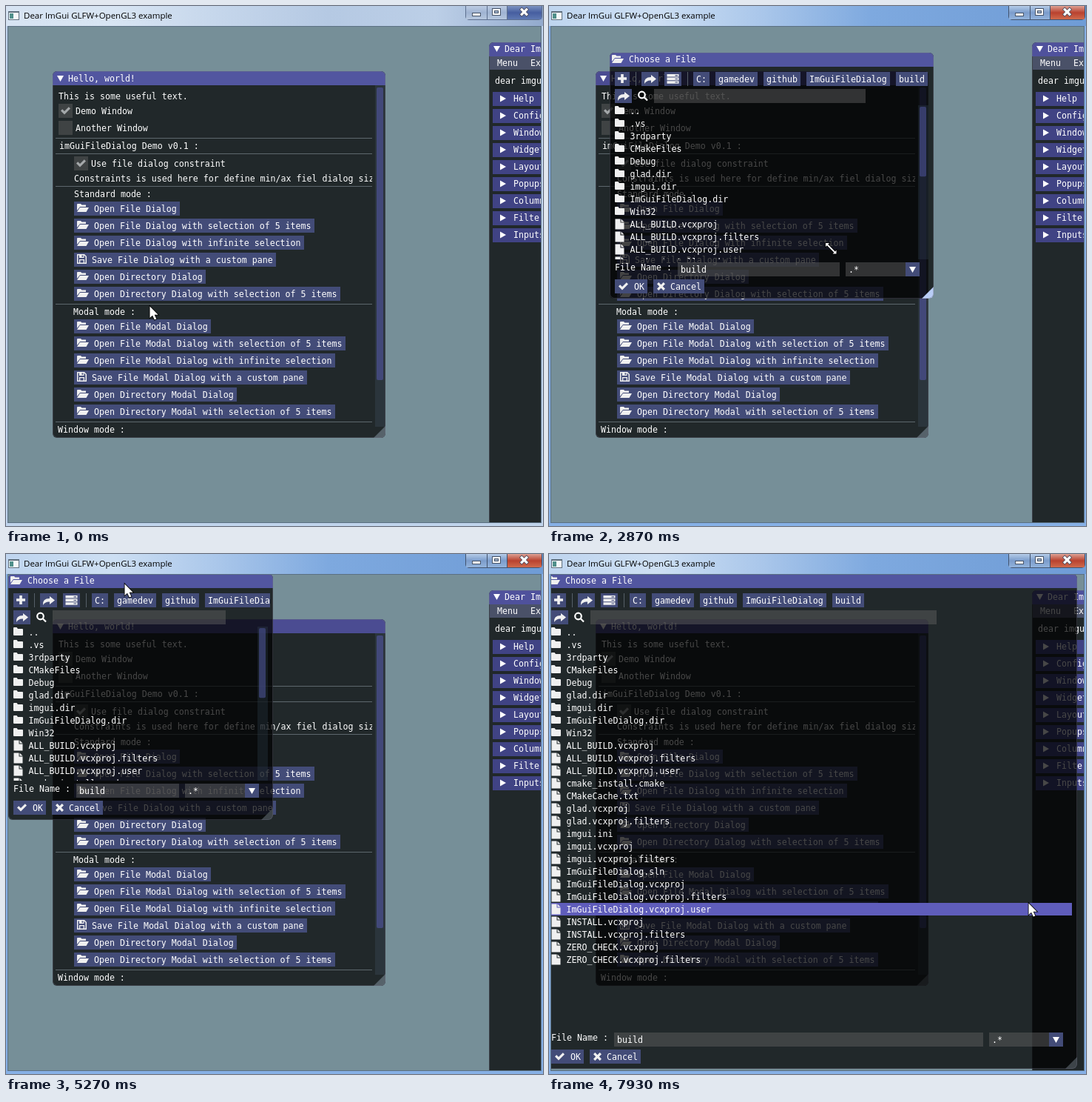
These frames come from a looping animation (726x702 px, 8000 ms). An HTML page with a canvas:

```html
<!DOCTYPE html>
<html lang="en">
<head>
<meta charset="utf-8">
<title>File dialog demo</title>
<style>
html, body { margin: 0; width: 100%; height: 100%; overflow: hidden; background: #768f98; }
canvas { display: block; }
</style>
</head>
<body>
<canvas id="stage" width="726" height="702"></canvas>
<script>
const ctx = document.getElementById('stage').getContext('2d');
const LOOP = 8000;
const MONO = '11.627px "DejaVu Sans Mono", monospace';
const WHITE = '#fff', BUTTON = '#434c78', FIELD = 'rgba(100,100,100,.45)', GLASS = 'rgba(0,0,0,.72)';

// Each key: time, then the values reached at that time.
const cursorKeys = [
  [0, 194, 405], [200, 196, 421], [330, 190, 400], [670, 167, 278], [1270, 167, 278],
  [1800, 470, 390], [2130, 592, 399], [2200, 596, 399], [2400, 596, 399], [2670, 560, 365],
  [2800, 490, 345], [2870, 381, 327], [3000, 290, 296], [3130, 251, 278], [3530, 250, 277],
  [3670, 256, 272], [3870, 256, 272], [4470, 231, 69], [4730, 209, 58], [5270, 160, 40],
  [5600, 153, 40], [6130, 340, 343], [6270, 342, 345], [6470, 351, 356], [6730, 351, 356],
  [6870, 423, 444], [7330, 715, 692], [7530, 715, 692], [7730, 663, 497], [7800, 663, 497],
  [7870, 654, 491], [7930, 648, 471]
];
// left, top, right, bottom
const dialogKeys = [
  [2400, 82, 63, 600, 403], [2670, 82, 63, 575, 396], [2870, 82, 63, 520, 395],
  [3000, 82, 63, 441, 395], [4470, 82, 63, 441, 395], [4730, 60, 52, 418, 385],
  [5270, 3, 27, 361, 359], [5600, -4, 27, 355, 359], [6730, -4, 27, 355, 359],
  [6870, -4, 27, 382, 399], [7330, -4, 27, 714, 695]
];

const projects = ['ALL_BUILD.vcxproj', 'ALL_BUILD.vcxproj.filters', 'ALL_BUILD.vcxproj.user',
  'cmake_install.cmake', 'CMakeCache.txt', 'glad.vcxproj', 'glad.vcxproj.filters', 'imgui.ini',
  'imgui.vcxproj', 'imgui.vcxproj.filters', 'ImGuiFileDialog.sln', 'ImGuiFileDialog.vcxproj',
  'ImGuiFileDialog.vcxproj.filters', 'ImGuiFileDialog.vcxproj.user', 'INSTALL.vcxproj',
  'INSTALL.vcxproj.filters', 'ZERO_CHECK.vcxproj', 'ZERO_CHECK.vcxproj.filters'];
const folders = ['..', '.vs', '3rdparty', 'CMakeFiles', 'Debug', 'glad.dir', 'imgui.dir',
  'ImGuiFileDialog.dir', 'Win32'];
const rows = [...folders, ...projects];

const icons = {
  open: new Path2D('M0 1Q0 0 1 0H5L6.5 1.5H12V4H4L0 9zM0 11L4 5H16L12.5 11z'),
  folder: new Path2D('M0 1Q0 0 1 0H4.5L6 2H12Q13 2 13 3V10Q13 11 12 11H1Q0 11 0 10z'),
  file: new Path2D('M0 0H7V5H12V14H0zM8 0L12 4H8z'),
  floppy: new Path2D('M0 0H10L13 3V13H0zM1.5 1.5V11.5H3V7H10V11.5H11.5V3.5L9.5 1.5V5H3V1.5zM4.3 8.2V11.5H8.7V8.2zM6.5 1.5V3.8H8.3V1.5z'),
  plus: new Path2D('M4.2 0H7.8V4.2H12V7.8H7.8V12H4.2V7.8H0V4.2H4.2z'),
  share: new Path2D('M0 12Q-1 3 9 3V0L16 5.5L9 11V7.5Q3 7 0 12z'),
  list: new Path2D('M0 0H16V3.6H0zM0 4.6H16V8.2H0zM0 9.2H16V12.8H0zM11 1.3V2.4H14.5V1.3zM11 5.9V7H14.5V5.9zM11 10.5V11.6H14.5V10.5z'),
  check: new Path2D('M0 5.5L2.2 3.3L5 6.1L10.8 .3L13 2.5L5 10.5z'),
  cross: new Path2D('M0 2.3L2.3 0L5.5 3.2L8.7 0L11 2.3L7.8 5.5L11 8.7L8.7 11L5.5 7.8L2.3 11L0 8.7L3.2 5.5z'),
  arrow: new Path2D('M.5 .5V16L4 12.7L6.8 18.6L9.4 17.4L6.7 11.8H11.6z'),
  resize: new Path2D('M-7 -7H-2L-3.8 -5.2L5.8 4.4L7.5 2.5V7.5H2.5L4.4 5.8L-5.2 -3.8L-7 -2z')
};

function sample(keys, t) {
  const next = keys.findIndex(k => k[0] > t);
  if (next === 0) return keys[0].slice(1);
  if (next < 0) return keys[keys.length - 1].slice(1);
  const a = keys[next - 1], b = keys[next], p = (t - a[0]) / (b[0] - a[0]);
  return a.slice(1).map((v, i) => Math.round(v + (b[i + 1] - v) * p));
}

function rect(x, y, w, h, color) {
  ctx.fillStyle = color;
  ctx.fillRect(x, y, w, h);
}

function roundRect(x, y, w, h, radius, color) {
  ctx.fillStyle = color;
  ctx.beginPath();
  ctx.roundRect(x, y, w, h, radius);
  ctx.fill();
}

function text(str, x, centerY, color = WHITE) {
  ctx.font = MONO;
  ctx.fillStyle = color;
  ctx.fillText(str, x, Math.round(centerY + 4));
}

function icon(name, x, y, color = '#f0f0f0', outline) {
  ctx.save();
  ctx.translate(x, y);
  if (outline) {
    ctx.strokeStyle = outline;
    ctx.lineWidth = 1.6;
    ctx.stroke(icons[name]);
  }
  ctx.fillStyle = color;
  ctx.fill(icons[name], 'evenodd');
  ctx.restore();
}

function polygon(color, ...pts) {
  ctx.fillStyle = color;
  ctx.beginPath();
  for (let i = 0; i < pts.length; i += 2) ctx.lineTo(pts[i], pts[i + 1]);
  ctx.fill();
}

const downArrow = (x, cy) => polygon(WHITE, x, cy - 4, x + 9, cy - 4, x + 4.5, cy + 4);

function clip(x, y, w, h, draw) {
  ctx.save();
  ctx.beginPath();
  ctx.rect(x, y, w, h);
  ctx.clip();
  draw();
  ctx.restore();
}

function gradient(x1, y1, ...stops) {
  const g = ctx.createLinearGradient(0, 0, x1, y1);
  stops.forEach((c, i) => g.addColorStop(i / (stops.length - 1), c));
  return g;
}

function panel(l, t, r, b, titleColor, gripColor) {
  ctx.save();
  ctx.beginPath();
  ctx.roundRect(l, t, r - l, b - t, 6);
  ctx.clip();
  rect(l, t, r - l, b - t, GLASS);
  rect(l, t, r - l, 19, titleColor);
  if (gripColor) polygon(gripColor, r, b - 16, r, b, r - 16, b);
  ctx.restore();
  ctx.strokeStyle = 'rgba(110,110,128,.35)';
  ctx.lineWidth = 1;
  ctx.beginPath();
  ctx.roundRect(l + .5, t + .5, r - l - 1, b - t - 1, 6);
  ctx.stroke();
}

function textButton(str, x, y) {
  const w = str.length * 7 + 8;
  rect(x, y, w, 19, BUTTON);
  text(str, x + 4, y + 9.5);
  return w;
}

function chrome(active) {
  rect(0, 0, 726, 702, active ? '#86b0e6' : '#c0d4ec');
  rect(0, 0, 726, 27, active
    ? gradient(726, 0, '#bfd5ef', '#cddff3', '#a9c6ea', '#7ea9df', '#76a2da', '#6f9cd6')
    : gradient(726, 0, '#d6e3f2', '#d8e5f3', '#c5d6eb', '#b5c9e3', '#bccfe7', '#93aacd'));
  rect(2, 27, 722, 671, '#5b7083');
  rect(3, 28, 720, 669, '#768f98');
  rect(3, 7, 15, 12, '#5f6f7c');
  rect(4, 9, 13, 9, '#f4f8fa');
  rect(5, 10, 5, 7, '#4f8f8a');
  ctx.font = '11.5px "Open Sans", sans-serif';
  ctx.fillStyle = '#000';
  ctx.fillText('Dear ImGui GLFW+OpenGL3 example', 24, 17);

  roundRect(621, -6, 104, 25, 5, active ? '#42536e' : '#5d6f8e');
  const pale = active ? gradient(0, 18, '#b4cbe8', '#7b9ccb', '#93b3dc') : gradient(0, 18, '#bccbe2', '#9fb3d2', '#b6c7de');
  rect(622, 0, 28, 18, pale);
  rect(651, 0, 26, 18, pale);
  rect(678, 0, 46, 18, active ? gradient(0, 18, '#dda093', '#b9422f', '#cf6a4c') : gradient(0, 18, '#7b92c0', '#465ea0', '#5e78b2'));
  rect(630, 9, 12, 5, '#475468');
  rect(631, 10, 10, 3, WHITE);
  rect(657, 3, 12, 10, '#475468');
  rect(658, 4, 10, 8, WHITE);
  rect(660, 6, 6, 4, '#475468');
  rect(661, 7, 4, 2, '#a0b3ce');
  icon('cross', 695, 2.5, WHITE, '#4a4a5c');
}

function checkbox(x, y, checked, label) {
  rect(x, y, 19, 19, FIELD);
  if (checked) icon('check', x + 3, y + 4, '#a4a8aa');
  text(label, x + 23, y + 10);
}

function modeButtons(top, kind, pressed) {
  const labels = [`Open File ${kind}Dialog`, `Open File ${kind}Dialog with selection of 5 items`,
    `Open File ${kind}Dialog with infinite selection`, `Save File ${kind}Dialog with a custom pane`,
    `Open Directory ${kind}Dialog`,
    `Open Directory ${kind || 'Dialog '}with selection of 5 items`];
  labels.forEach((label, i) => {
    const y = top + i * 23, save = i === 3, dx = save ? 24 : 27;
    rect(92, y, dx + label.length * 7 + 4, 19, pressed && i === 0 ? '#6484d3' : BUTTON);
    if (save) icon('floppy', 96, y + 2);
    else icon('open', 96, y + 3);
    text(label, 92 + dx, y + 9.5);
  });
}

function mainWindow(focused, pressed) {
  panel(63, 88, 513, 583, focused ? '#5256a0' : '#4b4c92', '#56626a');
  downArrow(69, 98);
  text('Hello, world!', 84, 98);
  rect(499, 107, 13, 461, 'rgba(60,78,95,.35)');
  roundRect(501, 110, 9, 395, 2, '#424879');
  clip(64, 107, 431, 475, () => {
    text('This is some useful text.', 71, 122);
    checkbox(71, 132, true, 'Demo Window');
    checkbox(71, 155, false, 'Another Window');
    text('imGuiFileDialog Demo v0.1 :', 72, 189);
    checkbox(92, 203, true, 'Use file dialog constraint');
    text('Constraints is used here for define min/ax fiel dialog size', 92, 233);
    text('Standard mode :', 92, 254);
    modeButtons(264, '', pressed);
    text('Modal mode :', 91, 413);
    modeButtons(423, 'Modal ');
    text('Window mode :', 70, 572);
    for (const y of [178, 199, 243, 402, 561]) rect(67, y, 428, 1, '#5d676d');
  });
}

function demoWindow() {
  panel(653, 49, 900, 720, '#4f519c');
  rect(654, 68, 80, 18, '#4a5168');
  downArrow(659, 58);
  text('Dear ImGui Demo', 674, 58);
  text('Menu', 664, 77);
  text('Examples', 709, 77);
  text('dear imgui says hello', 661, 101);
  ['Help', 'Configuration', 'Window options', 'Widgets', 'Layout', 'Popups', 'Columns',
    'Filtering', 'Inputs:'].forEach((label, i) => {
    const cy = 125 + i * 23;
    rect(658, cy - 9, 70, 19, '#404384');
    polygon(WHITE, 668, cy - 4.5, 676, cy, 668, cy + 4.5);
    text(label, 686, cy);
  });
}

function fileList(l, top, r, bottom, pointer) {
  const height = bottom - top, content = rows.length * 17, scrolls = content > height;
  const end = r - 7 - (scrolls ? 14 : 0);
  clip(l + 7, top - 1, r - l - 14, height + 1, () => {
    rows.forEach((name, i) => {
      const y = top - 1 + i * 17;
      if (pointer && pointer[1] >= y && pointer[1] < y + 17 && pointer[1] < bottom &&
          pointer[0] >= l + 7 && pointer[0] < end) rect(l + 7, y, end - l - 7, 17, '#5f5dbb');
      if (i < folders.length) icon('folder', l + 7, y + 2);
      else icon('file', l + 7.5, y + 1.5);
      text(name, l + 27.5, y + 9);
    });
    if (scrolls) {
      rect(r - 21, top, 14, height, 'rgba(50,68,85,.3)');
      roundRect(r - 19, top + 2, 9, height * height / content, 2, 'rgba(66,72,130,.72)');
    }
  });
}

function dialog([l, t, r, b], pointer, hot) {
  panel(l, t, r, b, '#5256a0', hot ? '#b9cdf6' : '#3d4449');
  icon('open', l + 3, t + 3);
  text('Choose a File', l + 26, t + 9);

  clip(l + 4, t + 19, r - l - 8, b - t - 20, () => {
    const bar = t + 26;
    rect(l + 7, bar, 20, 19, BUTTON);
    icon('plus', l + 11, bar + 3);
    rect(l + 43, bar, 23, 19, BUTTON);
    icon('share', l + 47, bar + 4);
    rect(l + 74, bar, 23, 19, BUTTON);
    icon('list', l + 77.5, bar + 3);
    for (const x of [35, 105]) rect(l + x, bar, 1, 19, '#565f68');
    let x = l + 113;
    for (const part of ['C:', 'gamedev', 'github', 'ImGuiFileDialog', 'build']) x += textButton(part, x, bar) + 8;

    rect(l + 7, t + 49, 23, 19, BUTTON);
    icon('share', l + 11, t + 53);
    ctx.strokeStyle = WHITE;
    ctx.lineWidth = 2.2;
    ctx.beginPath();
    ctx.arc(l + 43.5, t + 57, 4.3, 0, 7);
    ctx.moveTo(l + 47, t + 60.5);
    ctx.lineTo(l + 51, t + 64.5);
    ctx.stroke();
    ctx.lineWidth = 1;
    rect(l + 60, t + 49, Math.ceil((r - l) * .65) + 1, 19, FIELD);

    fileList(l, t + 71, r, b - 53, pointer);

    text('File Name :', l + 7, b - 42);
    rect(l + 92, b - 49, r - l - 219, 19, FIELD);
    text('build', l + 96, b - 39);
    rect(r - 119, b - 49, 81, 19, FIELD);
    rect(r - 38, b - 49, 19, 19, BUTTON);
    text('.*', r - 115, b - 39);
    downArrow(r - 33, b - 39);
    rect(l + 7, b - 26, 44, 19, BUTTON);
    icon('check', l + 12, b - 22);
    text('OK', l + 33, b - 16);
    rect(l + 59, b - 26, 69, 19, BUTTON);
    icon('cross', l + 64, b - 22);
    text('Cancel', l + 82, b - 16);
  });
}

function draw(now) {
  const step = Math.floor((now % LOOP + 4) * 15 / 1000) % 120;
  const t = Math.round(step * 100 / 15) * 10;
  const within = (a, b) => t >= a && t < b;
  const pointer = sample(cursorKeys, t);
  const resizing = within(2200, 3670) || within(6400, 7600);
  const dragging = within(4470, 5670) || within(7600, 7870);
  const opened = t >= 1000;

  chrome(t >= 870);
  clip(3, 28, 720, 669, () => {
    demoWindow();
    mainWindow(!opened, within(930, 1000));
    if (opened) dialog(sample(dialogKeys, t), resizing || dragging ? null : pointer, within(2200, 3930) || within(6400, 7600));
  });
  icon(resizing ? 'resize' : 'arrow', ...pointer, WHITE, '#000');
}

const start = performance.now();
function tick() {
  draw(performance.now() - start);
  requestAnimationFrame(tick);
}
tick();
</script>
</body>
</html>
```
